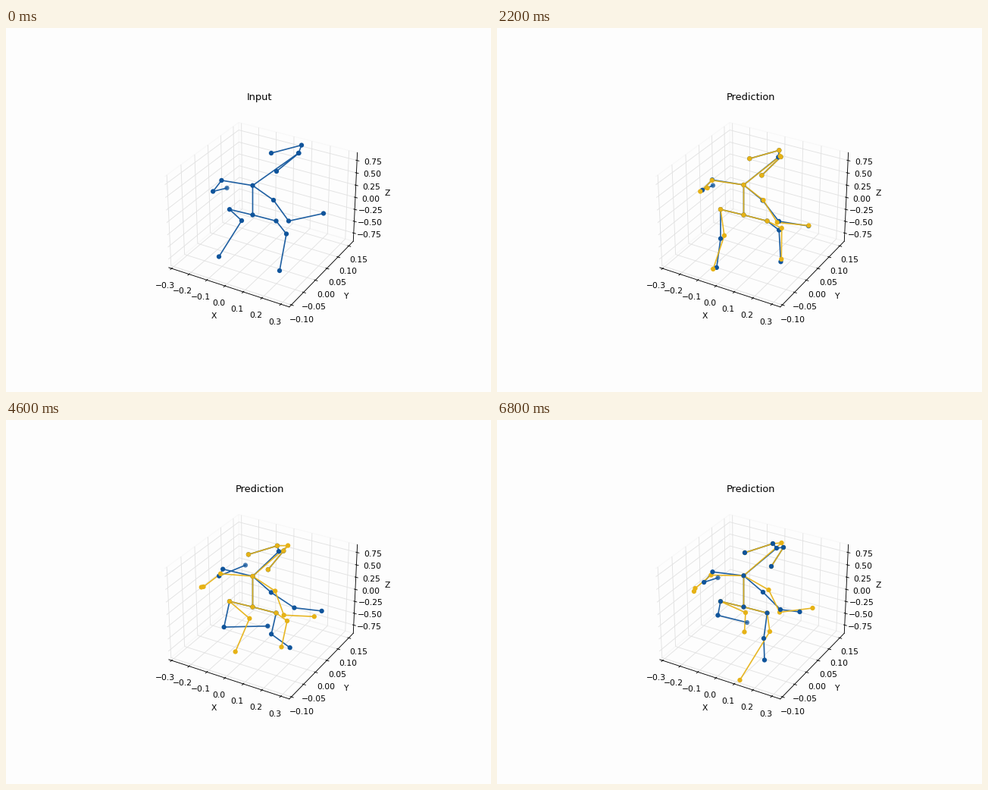
These frames come from a looping animation (640x480 px, 7 s). A matplotlib script:

```python
import numpy as np
import matplotlib.pyplot as plt
from matplotlib.animation import FuncAnimation

W, H, DPI = 640, 480, 80
FRAMES, STEP = 35, 200
LAST = (FRAMES - 1) * STEP
SWITCH = 2000          # prediction starts here (ms)
BLUE, GOLD = "#0f549b", "#e6b216"

CHAINS = ["neck hip", "neck nose eyeL earL", "nose eyeR earR",
          "neck shoulderL elbowL wristL", "neck shoulderR elbowR wristR",
          "hip pelvisL kneeL ankleL", "hip pelvisR kneeR ankleR"]
BONES = [pair for c in CHAINS for pair in zip(c.split(), c.split()[1:])]

# Turning points of the freely moving joints, in stage pixels
TURNS = (0, 1500, 3600, 5700, LAST)
PATHS = {
    "nose": [(386, 165), (376.5, 169), (362, 172), (362, 173), (369, 169)],
    "wristL": [(291.5, 211), (283, 210), (297, 200.5), (324, 189), (291.5, 208)],
    "elbowR": [(373, 254.5), (371, 256), (376, 251), (382, 246), (374, 250)],
    "wristR": [(419, 244.5), (415, 258), (405.5, 261), (422.5, 244.5), (399.5, 253)],
    "kneeL": [(311, 254), (296, 274), (297, 277), (281, 266), (291.5, 257.5)],
    "ankleL": [(281, 301.5), (280, 318.5), (320, 296.5), (358, 253), (330, 267)],
    "kneeR": [(370, 271.5), (377, 265), (356, 275), (348, 288.5), (352, 288)],
    "ankleR": [(361, 320), (372.5, 313), (374, 300), (370, 305.5), (353, 316.5)],
}

# Face joints keep an offset from the nose that turns evenly: first, last
FACE = {
    "eyeL": [(4, -10.5), (-5, -6)],
    "earL": [(-36, 0), (-42, 6)],
    "eyeR": [(0.5, 0), (9, -1)],
    "earR": [(-29, 24), (-7, 24)],
}

# The forecast leaves the actual pose and drifts evenly through these
DRIFT = {
    "nose": [(372, 166), (375.5, 162)],
    "shoulderL": [(282.5, 204.5)],
    "elbowL": [(261, 219.5), (261.5, 222)],
    "wristL": [(259, 219.5), (260, 226)],
    "shoulderR": [(358.5, 224)],
    "elbowR": [(366.5, 257.5), (373, 253.5)],
    "wristR": [(406.5, 260), (416.5, 248)],
    "kneeL": [(319.5, 263), (328, 254)],
    "ankleL": [(300, 308), (326.5, 279.5)],
    "kneeR": [(372, 264), (360, 279)],
    "ankleR": [(367, 297), (320.5, 343)],
}


def glide(keys, points, t):
    """Cubic Hermite curve through the points at time t."""
    k, p = np.asarray(keys, float), np.asarray(points, float)
    slope = np.gradient(p, k, axis=0, edge_order=min(2, len(k) - 1))
    i = int(np.clip(np.searchsorted(k, t, "right") - 1, 0, len(k) - 2))
    d = k[i + 1] - k[i]
    u = (t - k[i]) / d
    return ((2 * u**3 - 3 * u**2 + 1) * p[i] + (u**3 - 2 * u**2 + u) * d * slope[i]
            + (3 * u**2 - 2 * u**3) * p[i + 1] + (u**3 - u**2) * d * slope[i + 1])


def evenly(points, t, start=0):
    return glide(np.linspace(start, LAST, len(points)), points, t)


def actual_pose(t):
    pose = {name: glide(TURNS, pts, t) for name, pts in PATHS.items()}
    for name, offsets in FACE.items():
        pose[name] = pose["nose"] + evenly(offsets, t)
    # The left elbow and shoulder follow the wrist
    reach = pose["wristL"] - (285, 209)
    pose["elbowL"] = (271, 214.5) + reach * (0.33, 0.5)
    pose["shoulderL"] = (284, 200.5) + reach * (0.07, 0.22)
    pose["shoulderR"] = evenly([(353, 227), (350, 227.5), (351, 227)], t)
    pose["neck"] = evenly([(325.5, 207.7), (325.5, 205.3)], t)
    pose["hip"] = (325.5, 246.5)
    pose["pelvisL"] = (295, 239.2)
    pose["pelvisR"] = (356.5, 254.5)
    return pose


LEAVE = SWITCH - STEP
START = actual_pose(LEAVE)


def forecast_pose(t):
    pose = actual_pose(t)
    for name, pts in DRIFT.items():
        pose[name] = evenly([START[name], *pts], t, LEAVE)
    return pose


plt.rcParams.update({"grid.color": "#e2e2e2", "font.size": 9.7})
fig = plt.figure(figsize=(W / DPI, H / DPI), dpi=DPI, facecolor="#fdfdfd")

SIDE = 283
ax = fig.add_axes([193.5 / W, 94.3 / H, SIDE / W, SIDE / H], projection="3d")
ax.set_facecolor("none")
ax.set(xlim=(-0.316, 0.3444), ylim=(-0.1081, 0.1719), zlim=(-0.926, 0.905),
       xlabel="X", ylabel="Y")
ax.set_zlabel("Z", labelpad=2.5)
ax.set_xticks(np.arange(-3, 4) / 10)
ax.set_yticks(np.arange(-2, 4) / 20)
ax.set_zticks(np.arange(-3, 4) / 4)
for axis in (ax.xaxis, ax.yaxis, ax.zaxis):
    axis.pane.set(fill=False, edgecolor="#f2f2f2")

# Pixel-space layer for the figures
stage = fig.add_axes([0, 0, 1, 1])
stage.set(xlim=(0, W), ylim=(H, 0))
stage.axis("off")
title = stage.text(334.5, 95, "", fontsize="large", ha="center", va="baseline")


class Skeleton:
    def __init__(self, color, zorder):
        self.line, = stage.plot([], [], color=color, lw=1.5, alpha=0.93, zorder=zorder)
        self.dots = stage.scatter([], [], s=32, color=color, lw=0, zorder=zorder + 2)

    def show(self, pose, fade):
        gap = (np.nan, np.nan)
        path = np.array([p for a, b in BONES for p in (pose[a], pose[b], gap)])
        self.line.set_data(path[:, 0], path[:, 1])
        self.dots.set_offsets(list(pose.values()))
        self.dots.set_alpha([fade.get(name, 1) for name in pose])

    def set_visible(self, on):
        self.line.set_visible(on)
        self.dots.set_visible(on)


actual = Skeleton(BLUE, 2)
forecast = Skeleton(GOLD, 3)


def draw(i):
    t = i * STEP
    predicting = t >= SWITCH
    title.set_text("Prediction" if predicting else "Input")
    # Far joints look paler
    far_ankle = np.interp(t, [4400, 5600], [1, 0.7])
    actual.show(actual_pose(t), {"wristL": 0.75, "ankleL": far_ankle})
    forecast.set_visible(predicting)
    if predicting:
        forecast.show(forecast_pose(t), {})
    # The actual figure comes to the front late in the walk
    actual.dots.set_zorder(6 if t >= 5400 else 4)
    return actual.line, actual.dots, forecast.line, forecast.dots, title


anim = FuncAnimation(fig, draw, frames=FRAMES, interval=STEP, repeat=True,
                     repeat_delay=0, blit=False)
plt.show()
```
